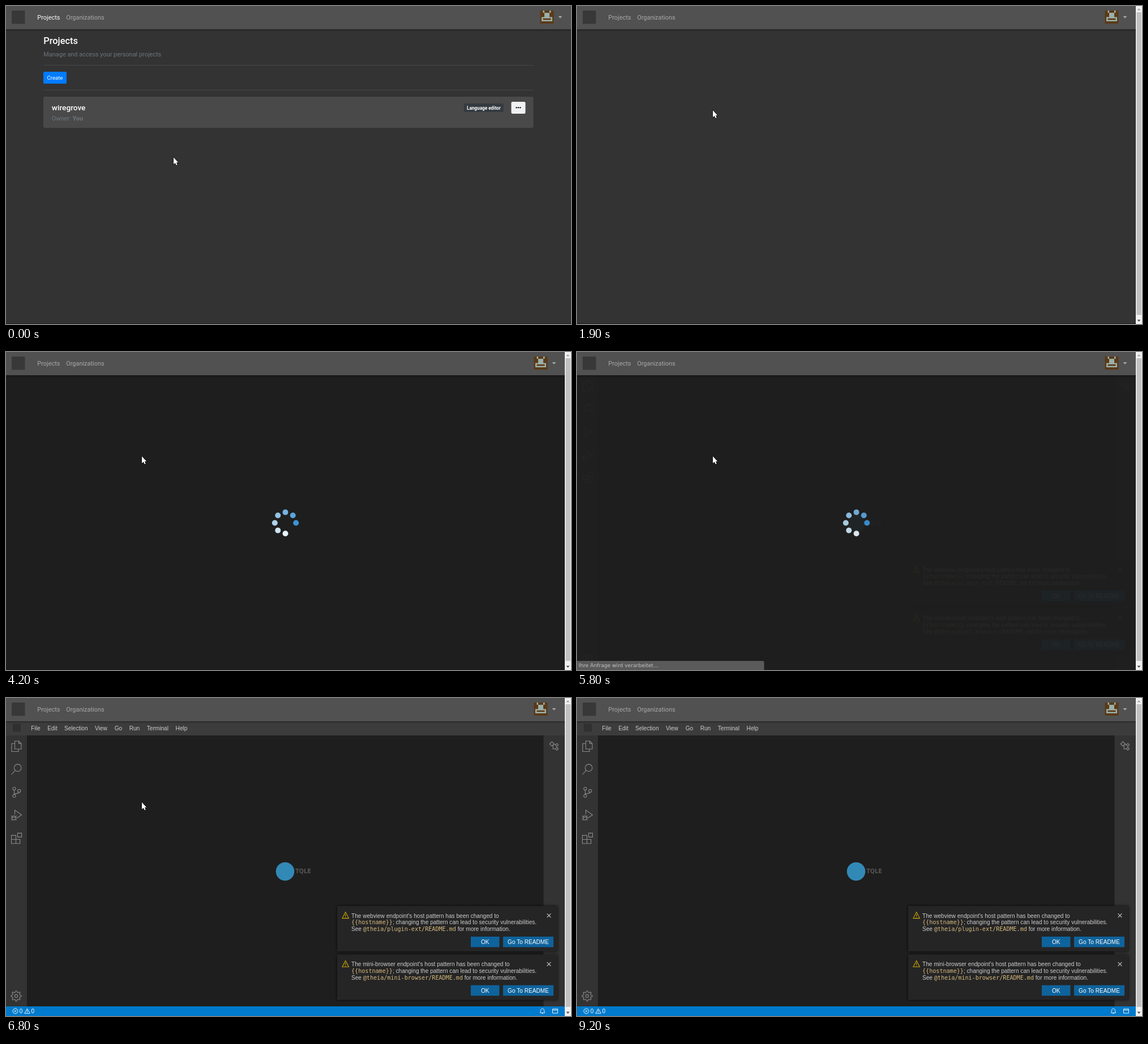
An HTML page with a canvas that plays this animation: 998 px wide and 561 px high, repeating every 9.6 s.

```html
<!DOCTYPE html>
<html lang="en">
<head>
<meta charset="utf-8">
<title>Project editor start</title>
<style>
html, body { margin: 0; width: 100%; height: 100%; overflow: hidden; background: #333; }
canvas { display: block; }
</style>
</head>
<body>
<canvas id="stage" width="998" height="561"></canvas>
<script>
const ctx = document.getElementById('stage').getContext('2d');
const W = 998, H = 561, NAV = 41, PAGE = 987, LOOP = 9600;
const ROBOTO = 'Roboto, sans-serif';
const SANS = '"Liberation Sans", Arial, sans-serif';
const MONO = '"DejaVu Sans Mono", monospace';
const DEJAVU = '"DejaVu Sans", sans-serif';
const UI = '10.1px ' + SANS;

const rect = (x, y, w, h, color) => {
  ctx.fillStyle = color;
  ctx.fillRect(x, y, w, h);
};
const round = (x, y, w, h, r, color) => {
  ctx.fillStyle = color;
  ctx.beginPath();
  ctx.roundRect(x, y, w, h, r);
  ctx.fill();
};
const disc = (x, y, r, color) => {
  ctx.fillStyle = color;
  ctx.beginPath();
  ctx.arc(x, y, r, 0, 7);
  ctx.fill();
};
// Draws text and returns the x where it ends.
const text = (str, x, y, font, color, align = 'left') => {
  ctx.font = font;
  ctx.fillStyle = color;
  ctx.textAlign = align;
  ctx.fillText(str, x, y);
  return x + ctx.measureText(str).width;
};
const line = (path, x, y, color, width = 1.1) => {
  ctx.save();
  ctx.translate(x, y);
  ctx.strokeStyle = color;
  ctx.lineWidth = width;
  ctx.stroke(new Path2D(path));
  ctx.restore();
};
const shape = (path, x, y, color) => {
  ctx.save();
  ctx.translate(x, y);
  ctx.fillStyle = color;
  ctx.fill(new Path2D(path));
  ctx.restore();
};
const ring = (x, y, r) => `M${x + r} ${y}A${r} ${r} 0 1 1 ${x - r} ${y}A${r} ${r} 0 1 1 ${x + r} ${y}`;
const mix = (a, b, p) => a + (b - a) * p;

function gearPath() {
  let d = '';
  for (let i = 0; i < 32; i++) {
    const a = (i - 0.5) * Math.PI / 16;
    const r = i % 4 < 2 ? 9 : 6.6;
    d += (i ? 'L' : 'M') + (r * Math.cos(a)).toFixed(2) + ' ' + (r * Math.sin(a)).toFixed(2);
  }
  return d + 'Z' + ring(0, 0, 2.6);
}

const ICONS = {
  files: 'M-3-9H4L8.5-4.5V5H-3ZM4-9V-4.5H8.5M-3-4.5H-8.5V9.5H3.5V5',
  search: ring(2.2, -2.4, 6.3) + 'M-2.4 2.2L-9 9.4',
  branch: ring(-4, -6.3, 2.6) + ring(-4, 6.5, 2.6) + ring(4.8, -2.4, 2.6) +
    'M-4-3.7V3.9M4.8.2C4.5 3.5-2.5 1-4 3.9',
  debug: 'M-3-1.5V-9L9-.6L.5 5.2M-7.6 4.6A3.1 3.7 0 0 1-1.4 4.6A3.1 3.7 0 0 1-7.6 4.6' +
    'M-7.4 3.4H-1.6M-9.4 1L-7 2.7M.4 1L-2 2.7M-9.8 5H-7.6M.8 5H-1.4M-9.2 9L-6.9 7M.2 9L-2.1 7',
  blocks: 'M-9-5H-1V9.3H-9ZM-9 2.1H6.2V9.3H-1M2-9H9V-2H2Z',
  gear: gearPath(),
  tree: 'M-3.7-8L.3-4L-4-.2L-7.8-4ZM-.7-3H3M-1.8-2.2V4.6H2.5M5-4.8L7.6-2.2L5 .4L2.4-2.2Z' +
    'M5 2L7.6 4.6L5 7.2L2.4 4.6Z',
  warn: 'M0-5.5L5.7 5.3H-5.7ZM0-1.8V2M0 3V4.2',
  cross: 'M-3.4-3.4L3.4 3.4M3.4-3.4L-3.4 3.4',
  bell: 'M-4 3H4L3-.5C3.2-5.8-3.2-5.8-3-.5ZM-1.2 3.2C-1 5 1 5 1.2 3.2',
  pane: 'M-4.5-3.7H4.5V3.7H-4.5ZM-4.5-1.7H4.5'
};
const CARET = 'M0 0H7L3.5 3.7Z';

function avatar(x) {
  const light = '#9cafa8', dark = '#5a3a17';
  rect(x, 8, 24, 23, dark);
  rect(x + 5, 8, 2.5, 4, light);
  rect(x + 16.5, 8, 2.5, 4, light);
  rect(x + 7.5, 12, 9, 7.5, light);
  rect(x + 2.5, 19.5, 19, 7.5, light);
  rect(x + 5, 21.8, 14, 2.7, dark);
  rect(x + 7.5, 19, 9, 1.2, light);
}

function nav(projects, organizations, right) {
  const shade = ctx.createLinearGradient(0, NAV, 0, NAV + 4);
  shade.addColorStop(0, 'rgba(0,0,0,.32)');
  shade.addColorStop(1, 'rgba(0,0,0,0)');
  rect(0, NAV, right, 4, shade);
  rect(0, 0, right, NAV, '#515151');
  round(10, 8, 23.5, 23.5, 1.5, '#383838');
  const font = '10.93px ' + ROBOTO;
  text('Projects', 55.3, 23.5, font, `rgba(255,255,255,${projects})`);
  text('Organizations', 106.2, 23.5, font, `rgba(255,255,255,${organizations})`);
  avatar(right - 54.5);
  shape(CARET, right - 22.5, 18, '#a8a8a8');
}

function projectList(hover) {
  text('Projects', 66.3, 67.2, '500 16.4px ' + ROBOTO, '#fff');
  text('Manage and access your personal projects', 66.3, 88.8, '10.93px ' + ROBOTO, '#6c757d');
  rect(66, 104, 865.5, 1, '#474747');
  round(66, 116, 41, 21, 2.2, '#007bff');
  text('Create', 86.5, 129.6, '9.56px ' + ROBOTO, '#fff', 'center');
  rect(66, 148, 865.5, 1, '#474747');
  round(66, 160, 865.5, 55, 2.7, hover ? '#505050' : '#494949');
  text('wiregrove', 80.8, 183.8, '500 13.66px ' + ROBOTO, '#fff');
  const x = text('Owner: ', 80.8, 201.8, '10.93px ' + ROBOTO, '#6c757d');
  text('You', x, 201.8, 'bold 10.93px ' + ROBOTO, '#6c757d');
  round(808.8, 172, 70, 15, 2.7, '#343a40');
  text('Language editor', 843.8, 182.5, 'bold 8.2px ' + ROBOTO, '#fff', 'center');
  round(892.5, 169, 25, 21, 2.2, '#f0f1f2');
  for (let i = -1; i < 2; i++) disc(905 + i * 3.4, 179.3, 1.3, '#212529');
}

function scrollbar() {
  rect(PAGE, 0, W - PAGE, H, '#f1f1f1');
  rect(PAGE + 1.5, 11, 8.5, 534, '#c1c1c1');
  shape('M-3 2H3L0-1.5Z', 992.5, 5.5, '#a3a3a3');
  shape('M-3-2H3L0 1.5Z', 992.5, 555.5, '#505050');
}

function button(label, x, y, w) {
  rect(x, y, w, 18.5, '#0e639c');
  text(label, x + w / 2, y + 13, UI, '#fff', 'center');
}

function notice(y, name) {
  const grey = '#ccc', gold = '#d7ba7d', mono = '10.1px ' + MONO;
  ctx.save();
  ctx.shadowColor = 'rgba(0,0,0,.8)';
  ctx.shadowBlur = 5;
  rect(585, y, 389, 80, '#252526');
  ctx.restore();
  line(ICONS.warn, 599.7, y + 16.3, '#cca700');
  line(ICONS.cross, 959, y + 16.8, '#ccc');
  text(`The ${name} endpoint's host pattern has been changed to`, 610, y + 20.5, UI, grey);
  let x = text('{{hostname}}', 610, y + 32.2, mono, gold);
  text('; changing the pattern can lead to security vulnerabilities.', x, y + 32.2, UI, grey);
  x = text('See ', 610, y + 43.8, UI, grey);
  const folder = name === 'webview' ? 'plugin-ext' : name;
  x = text(`@theia/${folder}/README.md`, x, y + 43.8, mono, gold);
  text(' for more information.', x, y + 43.8, UI, grey);
  button('OK', 821, y + 54, 50.5);
  button('Go To README', 878, y + 54, 89);
}

function menuBar() {
  rect(0, NAV, PAGE, 25, '#3c3c3c');
  round(12, 45.5, 14, 14, 1, '#303030');
  const items = { File: 44.3, Edit: 73.3, Selection: 103, View: 157, Go: 191.7, Run: 217.7, Terminal: 248.8, Help: 299.6 };
  for (const name in items) text(name, items[name], 57, UI, '#ccc');
}

function statusBar() {
  rect(0, 544, PAGE, 17, '#007acc');
  line(ring(0, 0, 4.5) + 'M-2-2L2 2M2-2L-2 2', 16.5, 552.3, '#fff', 0.9);
  text('0', 23.8, 556, UI, '#fff');
  line('M0-4.3L4.7 4H-4.7ZM0-1.5V1.4M0 2.2V3.2', 37.5, 552.3, '#fff', 0.9);
  text('0', 44.6, 556, UI, '#fff');
  line(ICONS.bell, 947.5, 552.3, '#fff', 0.9);
  line(ICONS.pane, 970, 552.3, '#fff', 0.9);
}

function editor(bars) {
  const top = bars ? 66 : NAV, bottom = bars ? 544 : H, grey = '#8b8b8b';
  rect(0, NAV, PAGE, H - NAV, '#1e1e1e');
  rect(0, top, 37, bottom - top, '#333');
  rect(949.5, top, PAGE - 949.5, bottom - top, '#333');
  ['files', 'search', 'branch', 'debug', 'blocks'].forEach((name, i) =>
    line(ICONS[name], 18.5, top + 19 + i * 40.6, grey));
  line(ICONS.gear, 18, bottom - 18.3, grey);
  line(ICONS.tree, 968, top + 19, grey);
  const mid = (top + bottom) / 2;
  disc(493, mid + 1, 16.3, '#3289b5');
  text('TQLE', 511.2, mid + 4.3, 'bold 9.7px ' + DEJAVU, '#555');
  notice(367, 'webview');
  notice(452.7, 'mini-browser');
  if (bars) {
    menuBar();
    statusBar();
  }
}

const TURNS = [2400, 2700, 2900, 3100, 3300, 3400, 3600, 3800, 4100, 4200, 4500, 4600,
  4800, 5000, 5300, 5400, 5600, 5800, 6000, 6200, 6400, 6600];

function loader(t) {
  rect(0, NAV, PAGE, H - NAV, '#1e1e1e');
  const turn = TURNS.filter(time => time <= t).length;
  for (let i = 0; i < 7; i++) {
    const a = (turn - i - 2) * Math.PI / 4, p = i / 6;
    const color = `rgb(${mix(61, 232, p)},${mix(147, 243, p)},${mix(211, 250, p)})`;
    disc(493.5 + 18.7 * Math.cos(a), 301.5 + 18.7 * Math.sin(a), 5, color);
  }
}

function loaderAlpha(t) {
  if (t < 5800) return 1;
  if (t < 6200) return mix(0.94, 0.72, Math.min((t - 5800) / 200, 1));
  return Math.max(0, 0.6 * (6800 - t) / 600);
}

function bubble() {
  round(0, 545, 330.5, 16, [0, 2.5, 0, 0], '#5a5a5a');
  text('Ihre Anfrage wird verarbeitet…', 2.8, 556, '9.1px ' + DEJAVU, '#c2c2c2');
}

function pointerAt(t) {
  if (t < 8600) {
    const p = Math.min(Math.max((t - 200) / 900, 0), 1);
    const e = p * p * (3 - 2 * p);
    return [mix(296, 240, e), mix(267, 184, e)];
  }
  if (t < 8700) return [209, 132];
  if (t < 8900) return [180, 83.5];
  if (t < 9000) return [138, 45];
  return [97, 7];
}

function pointer([x, y]) {
  const arrow = 'M0 0V12.2L2.8 9.7L4.7 13.8L6.7 12.9L4.9 9H8.2Z';
  line(arrow, x, y, '#111', 1.5);
  shape(arrow, x, y, '#fff');
}

function draw(time) {
  const t = Math.floor(time % LOOP / 100) * 100;
  const opened = t >= 1700;
  const spot = pointerAt(t);
  rect(0, 0, W, H, '#333');
  if (!opened) projectList(spot[1] < 215);
  if (t >= 5800) editor(t >= 6200);
  if (t >= 2300 && t < 6800) {
    ctx.globalAlpha = loaderAlpha(t);
    loader(t);
    ctx.globalAlpha = 1;
  }
  if (t < 5800) rect(0, H - 1, W, 1, '#1b1b1b');
  if (t >= 5500 && t < 6200) bubble();
  const active = opened ? Math.max(0.5, 0.85 - (t - 1700) / 570) : 1;
  nav(active, t >= 9000 && t < 9200 ? 0.75 : 0.5, opened ? PAGE : W);
  if (opened) scrollbar();
  if (t < 9200) pointer(spot);
}

const start = performance.now();
function tick() {
  draw(performance.now() - start);
  requestAnimationFrame(tick);
}
tick();
</script>
</body>
</html>
```
